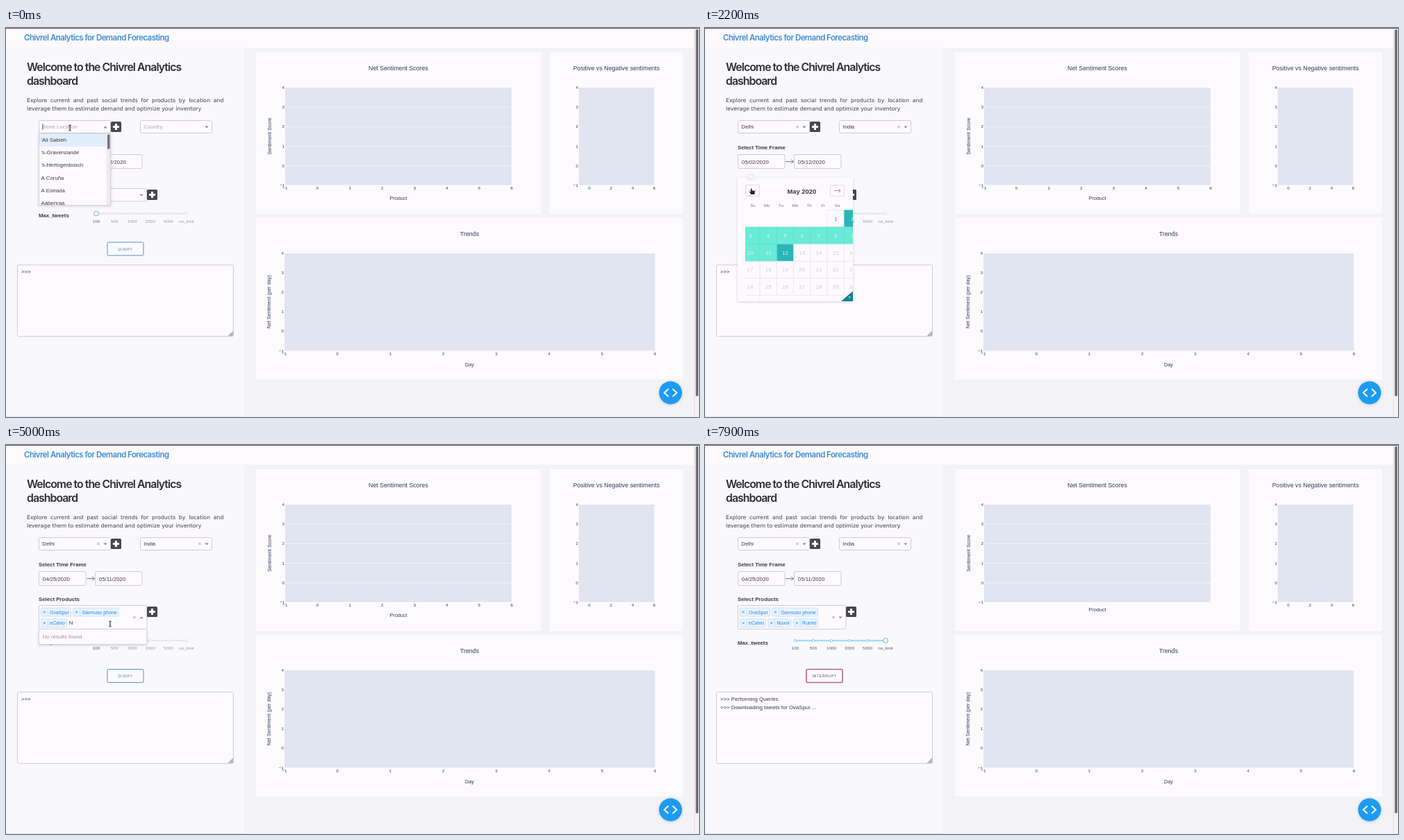
Write an HTML page with a canvas that moves like this. It is 998 by 561 pixels and loops after 8 s.

```html
<!DOCTYPE html>
<html lang="en">
<head>
<meta charset="utf-8">
<title>Analytics dashboard</title>
<style>
html, body { margin: 0; width: 100%; height: 100%; overflow: hidden; background: #f3f2f6; }
canvas { display: block; width: 998px; height: 561px; }
</style>
</head>
<body>
<canvas id="stage"></canvas>
<script>
const W = 998, H = 561, LOOP = 8000, STEP = 100;
const canvas = document.getElementById('stage');
const ctx = canvas.getContext('2d');
const dpr = window.devicePixelRatio || 1;
canvas.width = W * dpr;
canvas.height = H * dpr;

const SANS = '"Liberation Sans", Arial, sans-serif';
const HEAD = 'Inter, sans-serif';
const PAPER = '#fdfafe', LINE = '#cfccd2', INK = '#3c3a40', GREY = '#a9a7ad';
const NAVY = '#2a3f5f', BLUE = '#3b8dd6', PLOT = '#e1e5f1';

const BRAND = 'Chivrel';
const PRODUCTS = ['OvaSpur', 'Garmuso phone', 'eCalvo', 'Nuxol', 'Rumlo'];
const CITIES = ["'Ali Sabieh", "'s-Gravenzande", "'s-Hertogenbosch", 'A Coruña', 'A Estrada', 'Aabenraa',
  'Da Lat', 'Dakar', 'Dallas', 'Damascus', 'Dammam', 'Darwin', 'Debrecen', 'Delft', 'Delhi', 'Delmas', 'Denver'];
const COUNTRIES = {
  '': ['Afghanistan', 'Albania', 'Algeria', 'American Samoa', 'Andorra', 'Angola'],
  In: ['Argentina', 'Bahrain', 'Benin', 'Bolivia, Plurinational State\nof', 'Bonaire, Sint Eustatius\nand Saba', 'Bosnia and Herzegovina'],
  Ind: ['British Indian Ocean\nTerritory', 'India', 'Indonesia']
};

// Pointer stops: step, x, y, shape
const POINTER = [
  [0, 92, 144, 'beam'], [4, 92, 144, 'hand'], [6, 80, 162, 'hand'], [7, 80, 162, 'hand'], [10, 211, 143, 'beam'],
  [14, 211, 143, 'hand'], [15, 215, 180, 'hand'], [16, 215, 180, 'hand'], [19, 82, 193, 'beam'], [20, 82, 193, 'hand'],
  [22, 68, 236, 'hand'], [23, 68, 236, 'hand'], [25, 206, 350, 'hand'], [26, 206, 350, 'hand'], [27, 190, 236, 'hand'],
  [28, 190, 236, 'hand'], [29, 92, 336, 'hand'], [30, 92, 336, 'hand'], [32, 110, 241, 'beam'], [34, 75, 260, 'hand'],
  [36, 75, 260, 'hand'], [40, 197, 245, 'hand'], [41, 197, 245, 'hand'], [42, 80, 260, 'hand'], [43, 80, 260, 'hand'],
  [45, 195, 245, 'hand'], [46, 75, 260, 'hand'], [47, 75, 260, 'hand'], [50, 150, 258, 'beam'], [55, 150, 258, 'hand'],
  [57, 210, 241, 'hand'], [58, 210, 241, 'hand'], [61, 166, 254, 'beam'], [66, 166, 254, 'beam'], [68, 210, 241, 'hand']
].concat([[69, 210, 241, 'hand'], [70, 130, 283, 'hand'], [73, 260, 283, 'hand'], [76, 172, 334, 'hand'], [78, 172, 334, 'hand']]);

const between = (k, a, b) => k >= a && k < b;
const typed = (word, k, start) => word.slice(0, Math.max(0, k - start));

function setFont(size, weight = 400, family = SANS, spacing = 0) {
  ctx.font = `${weight} ${size}px ${family}`;
  ctx.letterSpacing = spacing + 'px';
}

// Text is placed by the vertical centre of its capitals.
function text(str, x, y, o = {}) {
  const size = o.size || 7.8;
  setFont(size, o.weight, o.family, o.spacing);
  ctx.textAlign = o.align || 'left';
  ctx.fillStyle = o.color || INK;
  ctx.fillText(str, x, y + size * 0.36);
}

function rect(x, y, w, h, fill) {
  ctx.fillStyle = fill;
  ctx.fillRect(x, y, w, h);
}

function box(x, y, w, h, fill, stroke, radius = 2, line = 1) {
  ctx.beginPath();
  ctx.roundRect(x, y, w, h, radius);
  if (fill) { ctx.fillStyle = fill; ctx.fill(); }
  if (stroke) { ctx.strokeStyle = stroke; ctx.lineWidth = line; ctx.stroke(); }
}

function path(points, stroke, line = 1) {
  ctx.beginPath();
  points.forEach(([x, y]) => ctx.lineTo(x, y));
  ctx.strokeStyle = stroke;
  ctx.lineWidth = line;
  ctx.stroke();
}

function poly(points, fill) {
  ctx.beginPath();
  points.forEach(([x, y]) => ctx.lineTo(x, y));
  ctx.closePath();
  ctx.fillStyle = fill;
  ctx.fill();
}

function disc(x, y, r, fill, stroke, line = 1) {
  ctx.beginPath();
  ctx.arc(x, y, r, 0, 7);
  ctx.fillStyle = fill;
  ctx.fill();
  if (stroke) { ctx.strokeStyle = stroke; ctx.lineWidth = line; ctx.stroke(); }
}

function shadowed(draw) {
  ctx.save();
  ctx.shadowColor = 'rgba(0,0,0,.16)';
  ctx.shadowBlur = 4 * dpr;
  ctx.shadowOffsetY = dpr;
  draw();
  ctx.restore();
}

function justified(str, x, y, width, size) {
  const words = str.split(' ');
  setFont(size, 400, '"DejaVu Sans", sans-serif');
  const widths = words.map(w => ctx.measureText(w).width);
  const gap = (width - widths.reduce((a, b) => a + b)) / (words.length - 1);
  words.forEach((w, i) => {
    text(w, x, y, { size, family: '"DejaVu Sans", sans-serif' });
    x += widths[i] + gap;
  });
}

function caretMark(x, y, up) {
  const d = up ? -1.4 : 1.4;
  poly([[x - 2.6, y - d], [x + 2.6, y - d], [x, y + d]], '#8e8c92');
}

function cross(x, y, color = '#9b999f', r = 1.7) {
  path([[x - r, y - r], [x + r, y + r]], color, 0.9);
  path([[x - r, y + r], [x + r, y - r]], color, 0.9);
}

function plusButton(x, y) {
  box(x, y, 15, 15, '#49474c', null, 1.5);
  rect(x + 6, y + 3, 3, 9, '#fff');
  rect(x + 3, y + 6, 9, 3, '#fff');
}

function arrow(x, y, dir, reach, color) {
  path([[x - reach * dir, y], [x + reach * dir, y]], color, 0.9);
  path([[x + (reach - 3) * dir, y - 3], [x + reach * dir, y], [x + (reach - 3) * dir, y + 3]], color, 0.9);
}

function select(x, s) {
  box(x + 0.5, 133.5, 103, 18, PAPER, LINE);
  const empty = !s.value && !s.input;
  text(s.value || s.input || s.hint, x + 5.3, 142.5, { color: empty ? GREY : INK });
  if (s.open && s.blink) rect(x + 5.5 + (s.input ? ctx.measureText(s.input).width + 1 : 0), 138, 0.8, 9, INK);
  if (s.value) cross(x + 86, 142.5);
  caretMark(x + 96, 143, s.open);
}

function menu(x, y, w, items, focus = 0) {
  const row = 18.2, h = Math.min(items.length * row, 103);
  shadowed(() => rect(x, y, w, h + 1, PAPER));
  ctx.save();
  ctx.beginPath();
  ctx.rect(x, y, w, h);
  ctx.clip();
  rect(x, y + focus * row, w, row + 0.6, '#e2eefb');
  items.forEach((item, i) => {
    const lines = item.split('\n'), mid = y + 9.2 + i * row;
    lines.forEach((l, j) => text(l, x + 3.5, mid + (j - (lines.length - 1) / 2) * 12.2));
  });
  if (items.length > 5) {
    rect(x + w - 6.5, y, 6.5, h, '#eeecf0');
    box(x + w - 5, y + 1.5, 3.5, 21, '#737177', null, 1.5);
  }
  ctx.restore();
  ctx.strokeStyle = LINE;
  ctx.lineWidth = 0.8;
  ctx.strokeRect(x + 0.4, y, w - 0.8, h + 0.6);
}

function plot(x, y, w, h, yLabelX, xTicks, tickY) {
  rect(x, y, w, h, PLOT);
  const tick = { size: 6.24, color: NAVY };
  const name = n => n < 0 ? '−' + -n : '' + n;
  for (let n = -1; n <= 4; n++) text(name(n), yLabelX, y + h * (4 - n) / 5, { ...tick, align: 'right' });
  xTicks.forEach(([n, tx]) => text(name(n), tx, tickY, { ...tick, align: 'center' }));
}

function chartTitle(str, x, y, size = 8.84) {
  text(str, x, y, { size, color: NAVY, align: 'center' });
}

function sideTitle(str, x, y) {
  ctx.save();
  ctx.translate(x, y);
  ctx.rotate(-Math.PI / 2);
  chartTitle(str, 0, 0, 7.28);
  ctx.restore();
}

function drawCharts(loading) {
  const spread = (x, step) => [-1, 0, 1, 2, 3, 4, 5, 6].map(n => [n, x + (n + 1) * step]);
  rect(360, 35, 410.5, 233, PAPER);
  rect(783, 35, 192, 233, PAPER);
  rect(360, 273.5, 615, 233.5, PAPER);

  plot(402, 86, 326, 140.5, 401, loading ? [] : spread(402, 46.6), 231);
  for (let i = 1; i < 5; i++) rect(402, 85.6 + i * 28.1, 326, i === 4 ? 1.4 : 0.9, '#f1f2f9');
  chartTitle('Net Sentiment Scores', 565, 57.5);
  chartTitle('Product', 565, loading ? 237 : 245.5, 7.28);
  sideTitle('Sentiment Score', 379, 156);

  plot(825, 86, 108.5, 140.5, 824, [0, 2, 4, 6].map(n => [n, 840 + n * 15.6]), 231);
  chartTitle('Positive vs Negative sentiments', 879, 57.5);

  plot(401, 325, 533.5, 140.3, 400, spread(401, 76.25), 470);
  chartTitle('Trends', 667.5, 296.5);
  chartTitle('Day', 667.5, 485, 7.28);
  sideTitle('Net Sentiment (per day)', 378, 395);

  shadowed(() => disc(957, 526, 16.6, '#1d9bf3'));
  path([[954, 520.5], [948, 526], [954, 531.5]], '#fff', 1.9);
  path([[960, 520.5], [966, 526], [960, 531.5]], '#fff', 1.9);
}

function drawPage() {
  rect(0, 0, W, H, '#f3f2f6');
  rect(0, 0, 992, 28.5, '#fef9fc');
  rect(0, 29, 343, 531, '#f9f8fd');
  rect(0, 559.8, 343, 1.2, '#e9e7ec');
  rect(991, 0, 7, H, '#f4f2f5');
  rect(991, 0, 0.8, H, '#dcdadf');
  box(993.4, 2, 3.6, 529, '#6d6b70', null, 1.6);
  rect(0, 0, W, 1, '#5c5a5f');
  text(BRAND + ' Analytics for Demand Forecasting', 26, 14,
    { size: 11.4, weight: 600, family: HEAD, spacing: -0.5, color: BLUE });
  const big = { size: 15.8, weight: 600, family: HEAD, spacing: -0.95, color: '#2f2d32' };
  text(`Welcome to the ${BRAND} Analytics`, 30, 56.5, big);
  text('dashboard', 30, 76.5, big);
  justified('Explore current and past social trends for products by location and', 30, 104, 283.5, 7.8);
  text('leverage them to estimate demand and optimize your inventory', 30, 116.5,
    { family: '"DejaVu Sans", sans-serif' });
}

function drawDates(start, end) {
  text('Select Time Frame', 47, 172, { weight: 700 });
  [[47.5, start], [128.5, end]].forEach(([x, date]) => {
    box(x, 182.5, 67.5, 20, PAPER, LINE, 1.5);
    text(date, x + 5.3, 192.7);
  });
  arrow(121.8, 192.7, 1, 5.5, '#5f5d63');
}

function drawProducts(s) {
  const h = s.tall ? 34 : 18.5, mid = 231.5 + h / 2;
  text('Select Products', 47, 222, { weight: 700 });
  const active = s.focus && !s.menu;
  if (active) box(47, 231.5, 156, h, null, 'rgba(90,160,225,.25)', 2.5, 3);
  box(47.5, 231.5, 155.5, h, PAPER, active ? BLUE : LINE);
  let x = 50.5, y = 241;
  s.chips.forEach((name, i) => {
    if (i === 2) { x = 50.5; y += 15.7; }
    setFont(7.02);
    const w = ctx.measureText(name).width + 15.2;
    box(x, y - 6, w, 12, '#e9f3fe', '#c0dcf7', 1, 0.8);
    path([[x + 9.8, y - 6], [x + 9.8, y + 6]], '#c0dcf7', 0.8);
    cross(x + 4.8, y, BLUE, 1.4);
    text(name, x + 12.6, y + 0.2, { size: 7.02, color: '#2486e2' });
    x += w + 3.4;
  });
  if (s.input) text(s.input, x - 0.2, y - 0.8);
  else if (s.focus && s.blink) rect(x - 0.5, y - 4.5, 0.8, 9, INK);
  if (!s.chips.length && !s.focus) text('Select...', 52.3, 240.7, { color: GREY });
  if (s.chips.length) cross(185, mid);
  caretMark(195, mid + 0.4, !!s.menu);
  plusButton(203, 233);
}

function drawSlider(y, step) {
  text('Max_tweets', 47, y + 2.7, { weight: 700 });
  const end = 130 + step * 26;
  box(129, y - 1, 132, 2.2, '#e9e7ec', null, 1);
  if (step) rect(130, y - 1, end - 130, 2.2, '#a9d9f6');
  ['100', '500', '1000', '2000', '5000', 'no_limit'].forEach((label, i) => {
    const x = 130 + i * 26, on = i <= step;
    disc(x, y, 1.7, PAPER, on ? '#8cc8ef' : '#e2e0e6', 0.9);
    text(label, x, y + 11, { size: 6.24, align: 'center', color: on ? '#59575d' : '#99979d' });
  });
  disc(end, y, 3.3, PAPER, '#7bbbea', 1.1);
}

function drawConsole(dy, lines, running) {
  box(146, 309 + dy, 52, 19, PAPER, running ? '#bd6577' : '#4d94cd', 1.5, running ? 1.6 : 1);
  text(running ? 'INTERRUPT' : 'QUERY', 172, 318.7 + dy,
    { size: 5.3, spacing: 0.52, align: 'center', color: running ? '#555358' : '#3b86c8' });
  box(16.5, 341.8 + dy, 311, 103, PAPER, LINE);
  poly([[327, 437 + dy], [327, 444.3 + dy], [319.5, 444.3 + dy]], '#c3c1c6');
  path([[320.5, 444 + dy], [327, 437.5 + dy]], '#8f8d93', 0.7);
  path([[324, 444 + dy], [327, 441 + dy]], '#8f8d93', 0.7);
  lines.forEach((l, i) => text('>>>' + l, 22, 351.5 + dy + i * 12.6));
}

function drawCalendar(s) {
  const left = 58, right = 213, tip = s.toEnd ? 144 : 66;
  shadowed(() => {
    rect(47, 216, 166, 178, PAPER);
    poly([[tip - 6, 216.5], [tip, 210.5], [tip + 6, 216.5]], PAPER);
  });
  path([[tip - 6, 216], [tip, 210.5], [tip + 6, 216]], '#dcdadf', 0.8);
  [[58.5, -1], [180.5, 1]].forEach(([x, dir]) => {
    box(x, 226.5, 20, 16, PAPER, '#dedce2', 1.5);
    arrow(x + 10, 234.5, dir, 4.5, '#8b898f');
  });
  text(s.april ? 'April 2020' : 'May 2020', 139.3, 236, { size: 9.36, weight: 700, align: 'center' });
  ['Su', 'Mo', 'Tu', 'We', 'Th', 'Fr', 'Sa'].forEach((d, i) =>
    text(d, 69 + i * 20.25, 255.5, { size: 6.1, align: 'center', color: '#77757b' }));

  ctx.save();
  ctx.beginPath();
  ctx.rect(left, 262, right - left, 132);
  ctx.clip();
  const first = s.april ? 3 : 5, days = s.april ? 30 : 31, cw = 24.25, ch = 24.6;
  for (let d = 1; d <= days; d++) {
    const slot = d + first - 1, col = slot % 7, row = Math.floor(slot / 7);
    const x = 54.8 + col * cw, y = 262.5 + row * ch, n = s.april ? d - 30 : d;
    const inside = n >= s.from && n <= s.to;
    const edge = n === s.from || n === s.to;
    if (inside) rect(x, y, cw + 0.3, ch + 0.2, edge ? '#2cb5b6' : '#6aead8');
    ctx.strokeStyle = inside ? '#62e2d1' : '#ebe9ee';
    ctx.lineWidth = 0.8;
    ctx.strokeRect(x, y, cw, ch);
    text(d, x + cw / 2 + (col ? 0 : -2), y + 12.2, {
      align: 'center', color: inside ? '#d5fbf5' : n > 11 ? '#cbc9cf' : '#77757b'
    });
  }
  ctx.restore();
  poly([[213, 379.5], [213, 394], [196, 394]], '#15808f');
  text('?', 208, 389.3, { size: 6, weight: 700, align: 'center', color: '#e6f7f8' });
}

function drawPointer(k) {
  if (k > 78) return;
  const i = POINTER.findLastIndex(p => p[0] <= k);
  const [k0, x0, y0, shape] = POINTER[i], [k1, x1, y1] = POINTER[i + 1] || POINTER[i];
  const u = k1 > k0 ? (k - k0) / (k1 - k0) : 0, e = u * u * (3 - 2 * u);
  ctx.save();
  ctx.translate(x0 + (x1 - x0) * e, y0 + (y1 - y0) * e);
  if (shape === 'beam') {
    path([[0, -3.5], [0, 3.5]], '#222', 1.1);
    path([[-1.8, -3.8], [1.8, -3.8]], '#222', 0.9);
    path([[-1.8, 3.8], [1.8, 3.8]], '#222', 0.9);
  } else {
    const hand = [[-2, -4.5], [-0.6, -4.5], [-0.3, -1.7], [3.2, -1], [4, 0], [3.2, 4], [-1.5, 4], [-4, 0.4], [-3.2, -0.4], [-2, 0.4]];
    path([...hand, hand[0]], '#fff', 1.2);
    poly(hand, '#252328');
  }
  ctx.restore();
}

function productState(k) {
  const count = [36, 43, 47, 58, 69].filter(at => k >= at).length;
  const input = k < 58 ? typed(PRODUCTS[3], k, 49) : k < 69 ? typed(PRODUCTS[4], k, 61) : '';
  const listing = between(k, 33, 36) || between(k, 41, 43) || between(k, 45, 47);
  return {
    chips: PRODUCTS.slice(0, count), input, tall: count > 2, focus: between(k, 33, 69),
    menu: input ? 'none' : listing ? 'list' : '', blink: k % 10 < 5
  };
}

function draw(k) {
  ctx.setTransform(dpr, 0, 0, dpr, 0, 0);
  const blink = k % 10 < 5, running = k >= 78;
  const products = productState(k), dy = products.tall ? 14.5 : 0;
  const city = { hint: 'Store Location', value: k >= 7 ? 'Delhi' : '', input: typed('Delhi', k, 2), open: k < 7, blink };
  const country = { hint: 'Country', value: k >= 16 ? 'India' : '', input: typed('India', k, 11), open: between(k, 10, 16), blink };

  drawPage();
  drawCharts(running);
  select(47, city);
  plusButton(151, 135);
  select(193, country);
  drawDates(k < 26 ? '05/02/2020' : '04/25/2020', k < 31 ? '05/12/2020' : '05/11/2020');
  drawProducts(products);
  drawSlider(267.5 + dy, Math.round(Math.min(1, Math.max(0, (k - 70) / 3)) * 5));
  const log = running ? [' Performing Queries'] : [''];
  if (k >= 79) log.push(` Downloading tweets for ${PRODUCTS[0]} ...`);
  drawConsole(dy, log, running);

  if (city.open) {
    const hits = CITIES.filter(c => c.startsWith(city.input));
    menu(47, 152, 104, hits.slice(0, 6));
  }
  if (country.open) {
    const n = country.input.length;
    menu(193, 152, 104, COUNTRIES[n < 2 ? '' : n < 3 ? 'In' : 'Ind'], n > 3 ? 1 : 0);
  }
  if (between(k, 20, 31)) {
    drawCalendar({ april: between(k, 23, 28), toEnd: k >= 26, from: k < 26 ? 2 : -5, to: k < 29 ? 12 : 11 });
  }
  const top = products.tall ? 265.5 : 250;
  if (products.menu === 'list') menu(47, top, 156, PRODUCTS.slice(products.chips.length, 3));
  if (products.menu === 'none') {
    shadowed(() => rect(47, top, 156, 22, PAPER));
    box(47.4, top, 155.4, 22, PAPER, LINE, 1, 0.8);
    text('No results found', 52.8, top + 11, { color: '#99979d' });
  }
  drawPointer(k);
}

const begin = performance.now();
function tick() {
  draw(Math.floor((performance.now() - begin) % LOOP / STEP));
  requestAnimationFrame(tick);
}
tick();
</script>
</body>
</html>
```
